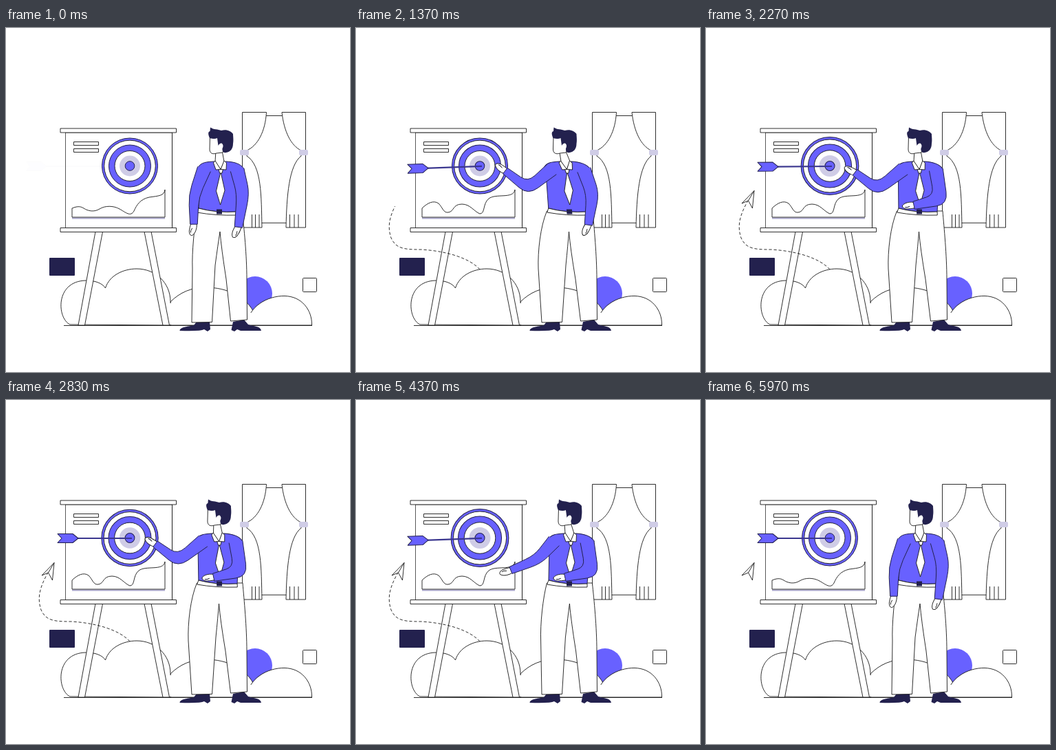
These frames come from a looping animation (500x500 px, 6000 ms). An HTML page:

```html
<!DOCTYPE html>
<html lang="en">
<head>
<meta charset="utf-8">
<title>Presenter</title>
<style>
html, body { margin: 0; width: 100%; height: 100%; overflow: hidden; background: #fff; }
svg { display: block; width: 100vw; height: 100vh; }
.line { fill: #fff; stroke: #191919; stroke-width: .9; stroke-linejoin: round; }
.thin { fill: none; stroke: #191919; stroke-width: .9; }
.purple { fill: #6861ff; }
.shirt { fill: #6861ff; stroke: #23214e; stroke-width: 1; stroke-linejoin: round; }
.dark { fill: #23214e; }
.pale { fill: #cfcce6; }
</style>
</head>
<body>
<svg viewBox="0 0 500 500">
  <!-- backdrop -->
  <circle class="purple" cx="362" cy="386" r="25"/>
  <path class="line" d="M239 398C253 384 270 377 290 377C322 377 348 391 359 411L359 432H239Z" stroke="none"/>
  <path class="line" d="M350 432C352 405 380 389 405 389.500C430 390 445 410 444.500 432Z"/>
  <path class="line" d="M93 431C74 422 71 368 116 367C130 367 140 371 144.500 378C150 360 170 350 190 350C217 350 239 370 239 398V432Z" stroke="none"/>
  <path fill="#fff" d="M236 400H242V431H236ZM346 414H362V431H346Z"/>
  <path class="thin" d="M84 432.500H425M425 432.500H445" />
  <rect class="line" x="431.500" y="363.500" width="20" height="20" rx="1"/>
  <rect class="dark" x="63" y="334" width="37" height="26" rx="1"/>

  <!-- window -->
  <path class="thin" d="M378 127.500H402M371 283.300H408"/>
  <path class="line" d="M343.500 122.500H378.500C377 150 366 171 350 178V186C372 200 371 245 372 290H343.500Z"/>
  <path class="line" d="M435.500 122.500H401C404 150 414 171 429 178V186C411 200 408 245 407 290H435.500Z"/>
  <path class="thin" d="M357.500 271V290M362.500 271V290M368 271V290M412.500 271V290M419 271V290M425 271V290"/>
  <rect class="pale" x="340" y="177" width="13" height="8" rx="2"/>
  <rect class="pale" x="426" y="177" width="13" height="8" rx="2"/>

  <!-- board -->
  <path class="line" d="M130 296L105 432H114.500L140.500 296ZM201 296L228 432H237.500L211 296Z"/>
  <rect class="line" x="86.500" y="152" width="155" height="139" stroke-opacity=".8"/>
  <path class="thin" d="M241.500 152V291" stroke-width="1.300"/>
  <rect class="line" x="79" y="146" width="168.500" height="6"/>
  <rect class="line" x="79" y="290.500" width="168.500" height="6"/>
  <rect class="line" x="98.500" y="165.500" width="36" height="5"/>
  <rect class="line" x="98.500" y="175.500" width="36" height="5"/>
  <path d="M96 276.500H231" stroke="#a9a6cc" stroke-width="2"/>
  <path id="graph" class="line"/>
  <g id="target">
    <circle class="shirt" r="40.500"/>
    <circle class="line" r="37.300"/>
    <circle class="shirt" r="30.500"/>
    <circle class="line" r="22"/>
    <circle class="pale" r="15"/>
    <circle class="shirt" r="6.800"/>
  </g>
  <g id="dart">
    <path d="M-80 0H3" stroke="#3b378f" stroke-width="2.200"/>
    <path class="shirt" d="M-105 -6.500H-83L-75 0L-83 6.500H-105L-99 0Z"/>
  </g>

  <!-- dashed trail -->
  <path id="trail" class="thin" stroke-width="1.100" d="M180 351C165 334 130 324 95 322C70 322 58 321 51 305C45 288 49 272 61 251"/>
  <path id="tip" class="line" d="M70 236.500L52 255L61.500 251L67.500 262ZL61.500 251"/>

  <!-- presenter -->
  <path class="dark" d="M252.500 440C253 434 266 434 273 432L277 427H296L297 438L293 441L288 438Q283 441 252.500 440Z"/>
  <path class="dark" d="M327.500 439L330 427L346 424L352 431C360 434 370 433 371 440H341L336 438L332 441Z"/>
  <path id="pants" class="line"/>
  <path id="neck" class="line"/>
  <g id="torso">
    <path class="shirt" d="M303 194C292 194.500 283 195 279 203L281 215L280 262Q305 269 336 267L339 230L346 205C341 197 332 194.500 319 194L312 207Z"/>
    <path class="line" d="M280 262Q305 269 336 267L336 272Q305 273 277.500 268Z"/>
    <rect class="dark" x="306" y="263.500" width="8" height="7"/>
    <path class="line" d="M312 209L305.500 237L311.500 257L318 236Z"/>
    <path class="line" d="M309 205H315.500L314 211H310.500Z"/>
    <path class="line" d="M304 193L301.500 196L305 206L312 205.500ZM317 193L320.500 196L320 206L312 205.500Z"/>
  </g>
  <path id="leftHand" class="line"/>
  <path id="leftArm" class="shirt"/>
  <path id="rightHand" class="line"/>
  <path id="rightArm" class="shirt"/>
  <g id="head">
    <path class="line" d="M296.500 158L296 176C296 182 300 184 306 182L315 181L320 160Z"/>
    <path class="dark" d="M296 160C294 155 293 151 296.500 150L297 144.500C302 148 308 147 313 149C321 147 327 150 330 154C330 157 331 163 330 168C330 176 326 180 320 181C316 182 314 179 314.500 175Q317 170 313.500 167.500Q310.500 167 308.500 171L307 160Q303 162 296 160Z"/>
  </g>
</svg>
<script>
const LOOP = 6000;
const $ = id => document.getElementById(id);
const set = (id, name, value) => $(id).setAttribute(name, value);
const mix = (a, b, k) => a + (b - a) * k;
const clamp = x => Math.min(1, Math.max(0, x));
const ease = x => x * x * (3 - 2 * x);
const ramp = (t, from, to) => ease(clamp((t - from) / (to - from)));
const mixAll = (a, b, k) => a.map((v, i) => mix(v, b[i], k));

// Eased interpolation over rows of [time, ...values].
function track(rows, t) {
  const i = rows.findIndex(row => row[0] > t);
  if (i < 0) return rows[rows.length - 1].slice(1);
  const a = rows[i - 1], b = rows[i];
  return mixAll(a, b, ramp(t, a[0], b[0])).slice(1);
}

// head shift, shoulder shift, thigh shift
const BODY = [
  [0, 0, 0, 0], [350, 0, 0, 0], [1300, -9.5, -6, 1], [1420, -9.5, -6, 1],
  [2200, -2, -2, 1], [3400, -4, -3, 1], [4300, -2, 0, .4], [5150, -4, -1, .2], [5850, 0, 0, 0]
];
// upper angle, upper length, forearm angle, forearm length, hand angle
const LEFT_ARM = [
  [0, 111, 42, 90, 41, 102], [400, 111, 42, 90, 41, 102], [1250, 141, 45, 218, 42, 214],
  [2200, 142, 48, 217, 41, 205], [3450, 142, 46, 217, 41, 212], [3650, 142, 46, 217, 41, 212],
  [4300, 132, 36, 158, 42, 162], [4430, 132, 36, 158, 42, 162], [5100, 111, 42, 90, 41, 102]
];
const RIGHT_ARM = [
  [0, 76, 36, 98, 49, 118], [500, 76, 36, 98, 49, 118], [1400, 70, 38, 98, 45, 118],
  [2150, 81, 44, 168, 40, 176], [5170, 81, 44, 168, 40, 176], [5850, 76, 36, 98, 49, 118]
];

const GRAPH_LOW = [96, 262, 101, 260, 107, 258, 113, 262, 119, 266, 128, 268, 136, 263, 144, 258, 156, 258, 165, 263,
  174, 268, 181, 275, 186, 266, 190, 257, 195, 249, 208, 246, 222, 244, 230, 244, 231, 235];
const GRAPH_HIGH = [96, 262, 104, 254, 113, 250, 120, 255, 126, 261, 127, 269, 134, 268, 143, 267, 140, 256, 154, 256,
  166, 256, 172, 267, 180, 270, 188, 270, 184, 255, 193, 248, 203, 240, 229, 249, 231, 235];

const unit = deg => [Math.cos(deg * Math.PI / 180), Math.sin(deg * Math.PI / 180)];
const along = (p, v, d) => [p[0] + v[0] * d, p[1] + v[1] * d];
const normal = v => [-v[1], v[0]];

// Tapered sleeve with a rounded, mitred elbow; open at the shoulder.
function sleeve(shoulder, elbow, wrist, u, f, widths) {
  const n1 = normal(u), n2 = normal(f);
  const scale = 1 + n1[0] * n2[0] + n1[1] * n2[1];
  const mitre = [(n1[0] + n2[0]) / scale, (n1[1] + n2[1]) / scale];
  const side = sign => {
    const a = along(shoulder, n1, sign * widths[0]);
    const c = along(elbow, mitre, sign * widths[1]);
    const b = along(wrist, n2, sign * widths[2]);
    return [a, mixAll(a, c, .65), c, mixAll(c, b, .35), b];
  };
  const p = side(1), q = side(-1);
  return `M${p[0]}L${p[1]}Q${p[2]} ${p[3]}L${p[4]}L${q[4]}L${q[3]}Q${q[2]} ${q[1]}L${q[0]}`;
}

function drawArm(name, shoulder, pose, widths, flip) {
  const [a1, l1, a2, l2, hand] = pose;
  const u = unit(a1), f = unit(a2);
  const elbow = along(shoulder, u, l1), wrist = along(elbow, f, l2);
  set(name + "Arm", "d", sleeve(shoulder, elbow, wrist, u, f, widths));
  set(name + "Hand", "d", "M-2 -4C5 -6 13 -5 16.500 -1C18 2 13 5 8 4.500C4 5 2 4 -2 4ZM6 1Q10 3 13 2");
  set(name + "Hand", "transform", `translate(${wrist}) rotate(${hand}) scale(1 ${flip})`);
}

function drawTrail(t) {
  const total = $("trail").getTotalLength();
  const end = total * ramp(t, 650, 1480), start = total * ramp(t, 5200, 5960);
  const dashes = [0, start];
  for (let s = 0; s < end; s += 7) {
    const from = Math.max(s, start), to = Math.min(s + 4.2, end);
    if (to > from) dashes.push(to - from, s + 7 - to);
  }
  dashes.push(0, total);
  set("trail", "stroke-dasharray", dashes.join(" "));
  set("trail", "visibility", end > start + .5 ? "visible" : "hidden");
  const grow = ramp(t, 1430, 1700);
  set("tip", "transform", `translate(61.500 251) scale(${grow}) translate(-61.500 -251)`);
  set("tip", "visibility", grow > 0 ? "visible" : "hidden");
}

function drawBoard(t) {
  const wave = ramp(t, 150, 1200) * (1 - ramp(t, 5000, 5850));
  const g = mixAll(GRAPH_LOW, GRAPH_HIGH, wave);
  set("graph", "d", `M${g.slice(0, 2)}C${g.slice(2)}L231 275H96Z`);

  const active = ramp(t, 500, 800) * (1 - ramp(t, 5200, 5700));
  const pulse = .5 - .5 * Math.cos((t - 1320) / 2000 * 2 * Math.PI);
  set("target", "transform", `translate(180 200.500) scale(${1 + .035 * pulse * active})`);

  const tilt = (.5 + .5 * Math.cos((t - 1370) / 3000 * 2 * Math.PI)) ** 1.5 * ramp(t, 450, 900);
  const shift = -46 * (1 - clamp(t / 560)) ** 2;
  set("dart", "transform", `translate(${180 + shift} 201) rotate(${-2 * tilt})`);
  set("dart", "opacity", clamp(t / 150));
}

function drawPresenter(t) {
  const [head, lean, thigh] = track(BODY, t);
  const left = 271 - 6 * thigh, crotch = 311 - 1.5 * thigh;
  set("pants", "d", `M277.500 266C${left + 3} 288 ${left - 1} 325 ${left} 350L270 428L299.500 427.500`
    + `L${304 + thigh} 345Q308 315 ${crotch} 296Q${crotch + 2} 320 ${320 - thigh} 365L326.500 426L350.500 424`
    + `L350 365C350 330 346 290 ${343 + thigh} 266Z`);
  set("torso", "transform", `matrix(1 0 ${-lean / 65} 1 ${lean * 265 / 65} 0)`);
  set("neck", "d", `M${305 + head} 178L${304 + lean} 194L${312 + lean} 206L${317 + lean} 194L${314 + head} 178Z`);
  set("head", "transform", `translate(${head} 0)`);
  drawArm("left", [288 + lean * .5, 205], track(LEFT_ARM, t), [10, 7.5, 5.3], 1);
  drawArm("right", [336 + lean * .8, 206], track(RIGHT_ARM, t), [10, 9, 5.7], -1);
}

function draw(t) {
  drawBoard(t);
  drawTrail(t);
  drawPresenter(t);
}

const began = performance.now();
function tick() {
  draw((performance.now() - began) % LOOP);
  requestAnimationFrame(tick);
}
draw(0);
tick();
</script>
</body>
</html>
```
